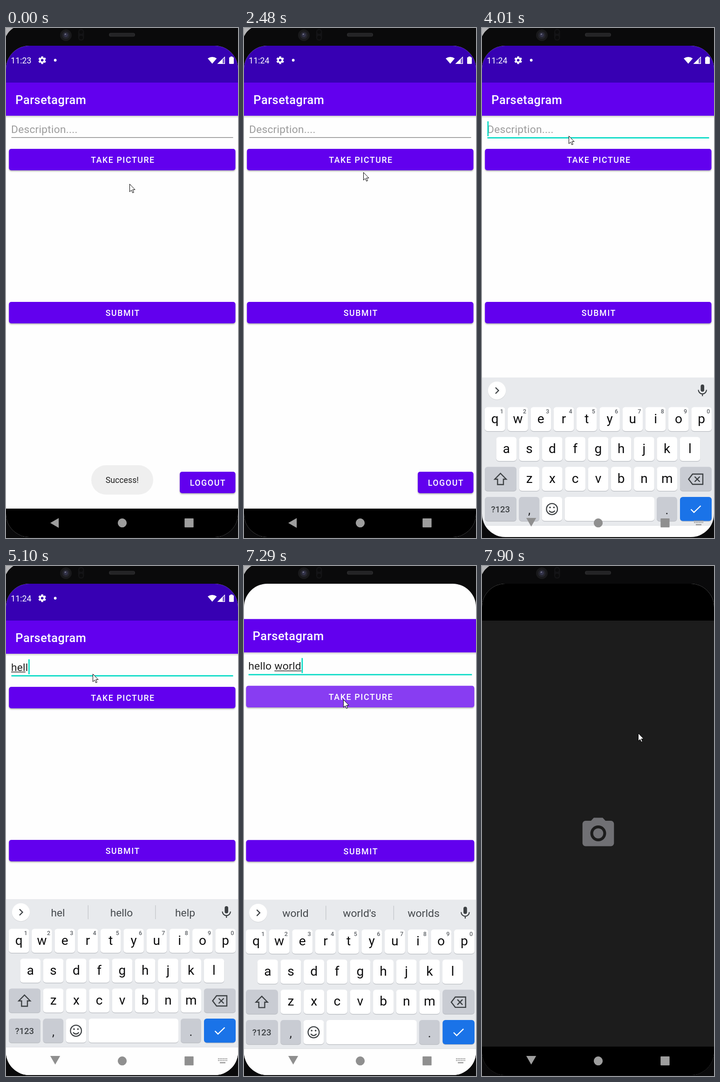
Animation of 498 by 1093 pixels, one loop 8000 ms. Source, as an HTML page with a canvas:

```html
<!DOCTYPE html>
<html lang="en">
<head>
<meta charset="utf-8">
<title>Post a picture</title>
<style>
html, body { margin: 0; width: 100%; height: 100%; overflow: hidden; background: #0a0a0b; }
canvas { display: block; width: 498px; height: 1093px; }
</style>
</head>
<body>
<canvas id="stage" width="498" height="1093"></canvas>
<script>
const g = document.getElementById('stage').getContext('2d');
const LOOP = 8000, W = 498, H = 1093;
const PURPLE = '#6200ee', TEAL = '#03dac5', INK = '#3c4043';
const FIELD = { size: 22.8, ls: 0.21 };

// Each row: start time, then the values held until the next row.
const pointer = [
  [0, 265, 334], [120, 240, 276], [240, 219, 236], [360, 212, 224],
  [2240, 230, 270], [2360, 254, 346], [2480, 256, 309], [2630, 258, 287],
  [3410, 218, 250], [3530, 186, 231], [6930, 199, 262], [7050, 213, 286],
  [7530, 285, 331], [7650, 335, 358]
];
// typed text, underlined range, suggestions
const typing = [
  [0, '', 0, 0, ''],
  [4620, 'h', 0, 0, ''],
  [4740, 'he', 0, 1, 'h,have,how'],
  [4860, 'he', 0, 2, 'he,hey,her'],
  [4980, 'hel', 0, 2, 'he,hello,help'],
  [5100, 'hell', 0, 3, 'hel,hello,help'],
  [5230, 'hello', 0, 4, 'hell,hello,help'],
  [5380, 'hello ', 0, 0, 'hello,hellos,help'],
  [5500, 'hello w', 6, 6, 'and,I,there'],
  [5620, 'hello wo', 6, 7, 'w,with,what'],
  [5740, 'hello worl', 6, 8, 'wo,would,world'],
  [5860, 'hello world', 6, 9, 'wor,world,work'],
  [6000, 'hello world', 6, 9, 'worl,world,work'],
  [6140, 'hello world', 6, 11, "world,world's,worlds"]
];
const caret = [[0, 0], [3650, 1], [4250, 0], [4620, 1], [6640, 0], [7170, 1]];
const toast = [[0, 1], [1320, 0.9], [1440, 0.6], [1560, 0.25], [1710, 0]];
const keyboardDrop = [[0, 999], [3890, 150], [4010, 35], [4130, 0], [7530, 999]];
const appZoom = [[0, 1], [7290, 1.0075], [7410, 1.04]];
const cameraZoom = [[0, 0], [7410, 0.94], [7530, 0.99], [7650, 1]];
const ripple = [[0, 0], [7170, 150], [7290, 600]];

function at(track, t) {
  let row = track[0];
  for (const r of track) if (r[0] <= t) row = r;
  return row.slice(1);
}

function rect(x, y, w, h, color) {
  g.fillStyle = color;
  g.fillRect(x, y, w, h);
}

function round(x, y, w, h, r, color) {
  g.beginPath();
  g.roundRect(x, y, w, h, r);
  g.fillStyle = color;
  g.fill();
}

function disc(x, y, r, color) {
  g.beginPath();
  g.arc(x, y, r, 0, 2 * Math.PI);
  g.fillStyle = color;
  g.fill();
}

function shape(color, ...pts) {
  g.beginPath();
  pts.forEach(p => g.lineTo(p[0], p[1]));
  g.closePath();
  g.fillStyle = color;
  g.fill();
}

function stroke(color, width, d) {
  g.strokeStyle = color;
  g.lineWidth = width;
  g.stroke(new Path2D(d));
}

function text(s, x, y, size, color, { weight = 400, align = 'left', ls = 0 } = {}) {
  g.font = `${weight} ${size}px Roboto, sans-serif`;
  g.letterSpacing = ls + 'px';
  g.textAlign = align;
  g.fillStyle = color;
  g.fillText(s, x, y);
}

function fieldWidth(s) {
  g.font = `400 ${FIELD.size}px Roboto, sans-serif`;
  g.letterSpacing = FIELD.ls + 'px';
  return g.measureText(s).width;
}

function button(label, x, y, w, cx) {
  g.save();
  g.shadowColor = 'rgba(0,0,0,0.3)';
  g.shadowBlur = 3;
  g.shadowOffsetY = 2;
  round(x, y, w, 46, 5, PURPLE);
  g.restore();
  return () => text(label, cx, y + 30.2, 17.75, '#fff', { weight: 500, align: 'center', ls: 1.585 });
}

function statusBar(t) {
  const white = '#fff', back = '#3700b3';
  rect(0, 38, W, 79, back);
  text(t < 1440 ? '11:23' : '11:24', 10.3, 76, 17.75, white);
  for (let i = 0; i < 6; i++) {
    g.save();
    g.translate(77.7, 69);
    g.rotate(i * Math.PI / 3);
    rect(-2.2, -8.2, 4.4, 5, white);
    g.restore();
  }
  disc(77.7, 69, 6.2, white);
  disc(77.7, 69, 2.8, back);
  disc(105.7, 69, 2.9, white);
  g.fillStyle = white;
  g.fill(new Path2D('M442.7 76.5L433 65.3Q442.7 58.5 452.4 65.3Z'));
  shape('rgba(255,255,255,0.35)', [454, 77], [470, 77], [470, 61]);
  shape(white, [454, 77], [465, 77], [465, 66]);
  stroke(white, 1.2, 'M455 76.4H469.4V62.4Z');
  round(479, 62.5, 10, 14.5, 1.5, white);
  rect(481.8, 61, 4.4, 2, white);
}

function field(t) {
  const [typed, from, to] = at(typing, t);
  const focused = t >= 3650;
  if (typed) text(typed, 11, 225, FIELD.size, '#212121', FIELD);
  else text('Description....', 11, 225, FIELD.size, '#9c9c9c', FIELD);
  if (to > from) {
    const x = fieldWidth(typed.slice(0, from));
    rect(11 + x, 226.6, fieldWidth(typed.slice(0, to)) - x, 1.4, '#212121');
  }
  if (focused) rect(11.5, 234, 476, 2.7, TEAL);
  else rect(11.5, 234, 476, 1.3, '#7c7c7c');
  if (at(caret, t)[0]) rect(11.5 + fieldWidth(typed), 200, 2.7, 32, TEAL);
}

function app(t) {
  const shade = g.createLinearGradient(0, 188, 0, 193);
  shade.addColorStop(0, 'rgba(0,0,0,0.2)');
  shade.addColorStop(1, 'rgba(0,0,0,0)');
  rect(0, 188, W, 5, shade);
  rect(0, 117, W, 71, PURPLE);
  text('Parsetagram', 20.3, 162.5, 25.4, '#fff', { weight: 500, ls: 0.5 });
  field(t);

  const takeLabel = button('TAKE PICTURE', 6.3, 259, 486.2, 251);
  const r = at(ripple, t)[0];
  if (r) {
    g.save();
    g.beginPath();
    g.roundRect(6.3, 259, 486.2, 46, 5);
    g.clip();
    disc(213, 286, r, 'rgba(255,255,255,0.24)');
    g.restore();
  }
  takeLabel();
  button('SUBMIT', 6.3, 587, 486.2, 250.8)();
  button('LOGOUT', 373, 951, 119.5, 433.4)();

  g.globalAlpha = at(toast, t)[0];
  round(183, 937, 133, 63, 31.5, '#efefef');
  text('Success!', 249.3, 975, 17.75, '#212121', { align: 'center' });
  g.globalAlpha = 1;
}

function key(x, y, w, color = '#fff') {
  round(x, y + 1.3, w, 51.5, 6, '#b9bcc1');
  round(x, y, w, 51.5, 6, color);
}

function letters(row, cx, y) {
  [...row].forEach((c, i) => {
    const x = cx + i * 49.27;
    key(x - 21.8, y, 43.6);
    text(c, x, y + 34, 28, '#0c0c0d', { align: 'center' });
  });
}

function suggestions(t) {
  const words = at(typing, t)[3];
  if (!words) return;
  words.split(',').forEach((w, i) =>
    text(w, 111.5 + 136.5 * i, 751, 22.8, '#45494d', { align: 'center' }));
  for (const x of [175.7, 320.2]) rect(x, 727, 1.3, 30, '#c3c6ca');
}

function keyboard(t) {
  const grey = '#c9ccd3';
  rect(0, 714, W, 317, '#e8eaed');
  rect(0, 1031, W, 62, '#fefefe');
  rect(0, 1030.5, W, 1, '#dcdee1');
  disc(32, 743, 19.3, '#d3d5d8');
  disc(32, 742, 19.2, '#fff');
  stroke(INK, 2.3, 'M29 735.5L35.5 742L29 748.5');
  round(469.4, 729, 7.6, 15.5, 3.8, INK);
  stroke(INK, 2.2, 'M464.5 740.5A8.7 8.7 0 0 0 481.9 740.5M473.2 749V754');
  suggestions(t);

  letters('qwertyuiop', 27.7, 777.5);
  for (let i = 0; i < 10; i++)
    text((i + 1) % 10, 42.3 + i * 49.27, 791, 12.5, '#5f6368', { weight: 500, align: 'center' });
  letters('asdfghjkl', 52.3, 841.5);

  key(6, 905.5, 68, grey);
  stroke(INK, 2.4, 'M39.7 919.5L52 932H46V943.5H33.4V932H27.4Z');
  letters('zxcvbnm', 101.6, 905.5);
  key(425, 905.5, 68, grey);
  stroke(INK, 2.4, 'M452 921H474V943H452L443.5 932ZM456.5 926.5L467.5 937.5M467.5 926.5L456.5 937.5');

  key(6, 970, 68, grey);
  text('?123', 39.7, 1003, 18.5, INK, { weight: 500, align: 'center' });
  key(79.5, 970, 43.6, grey);
  text(',', 101.5, 1007, 26, '#202124', { align: 'center' });
  key(128.5, 970, 43.6);
  stroke(INK, 2.3, 'M162 996A11.8 11.8 0 1 1 138.4 996A11.8 11.8 0 1 1 162 996M144 999.5Q150.2 1006.5 156.4 999.5');
  disc(146, 992.5, 1.8, INK);
  disc(154.4, 992.5, 1.8, INK);
  key(177.5, 970, 192.5);
  key(375, 970, 43.6, grey);
  text('.', 397, 1007, 26, '#202124', { align: 'center' });
  key(425, 970, 68, '#1a73e8');
  stroke('#fff', 2.4, 'M448.5 996.5L455 1003L469.5 989');
}

function navIcons(t) {
  const overKeys = t >= 3890;
  const color = t >= 7530 && t < 7900 ? '#808080' : t >= 3890 && t < 7530 ? '#8f8f8f' : '#9e9e9e';
  if (overKeys) shape(color, [95, 1050], [116.3, 1050], [105.6, 1068.5]);
  else shape(color, [95, 1060.8], [113.2, 1050.3], [113.2, 1071.3]);
  disc(249.5, 1060.7, 9.6, color);
  round(383.3, 1051, 19.3, 19.3, 1, color);
  if (t < 3770 || t >= 7900) return;
  for (let row = 0; row < 2; row++)
    for (let i = 0; i < 6; i++) rect(455.2 + i * 3.5, 1055 + row * 3.7, 2.1, 2.1, color);
  rect(459, 1063.4, 12, 2.2, color);
}

function zoomed(k, draw) {
  g.save();
  g.translate(W / 2, 565);
  g.scale(k, k);
  g.translate(-W / 2, -565);
  draw();
  g.restore();
}

function camera(t) {
  rect(0, 38, W, 1053, '#000');
  rect(0, 117, W, 913, '#1c1c1c');
  if (t < 7900) return;
  const grey = '#707074';
  shape(grey, [240, 539.5], [259, 539.5], [266, 547], [233, 547]);
  round(215.7, 546, 67.6, 54.5, 6.5, grey);
  disc(249.5, 573, 17, '#1c1c1c');
  disc(249.5, 573, 10.8, grey);
}

function bezel() {
  rect(0, 0, W, H, '#0a0a0b');
  g.fillStyle = '#b4b4b6';
  g.fill(new Path2D('M0 0H16Q6 6 0 18Z'));
  disc(128.5, 15.5, 12.5, '#19191b');
  disc(128.5, 15.5, 8, '#24242c');
  disc(128.5, 15, 4.5, '#34344a');
  disc(127.3, 13.3, 1.3, '#8a8a9c');
  round(155, 2, 12.5, 25, 6, '#141416');
  disc(161.2, 8.5, 4, '#0b0b0c');
  disc(161.2, 20.5, 4, '#0b0b0c');
  round(221, 10.5, 56, 8, 4, '#29292b');
  for (let x = 225; x < 274; x += 3) rect(x, 12, 1, 5, '#1b1b1d');
}

function arrow(x, y) {
  g.save();
  g.translate(x + 0.5, y + 0.5);
  const p = new Path2D('M0 0V16.5L3.8 13L6.4 18.8L8.9 17.7L6.4 12H11.5Z');
  g.fillStyle = '#fff';
  g.fill(p);
  g.strokeStyle = '#000';
  g.lineWidth = 1;
  g.stroke(p);
  g.restore();
}

function draw(t) {
  bezel();
  g.save();
  g.beginPath();
  g.roundRect(0, 38, W, 1053, 50);
  g.clip();
  rect(0, 38, W, 1053, '#fefefe');

  const zoom = at(appZoom, t)[0];
  const drop = at(keyboardDrop, t)[0];
  if (t < 7290) statusBar(t);
  zoomed(zoom, () => app(t));
  if (t < 3890 || drop > 0) rect(0, 1030, W, 63, '#000');
  if (drop < 400) {
    g.save();
    g.translate(0, drop);
    zoomed(zoom, () => keyboard(t));
    g.restore();
    if (!drop) rect(0, 1035, W, 58, '#fefefe');
  }
  const open = at(cameraZoom, t)[0];
  if (open) zoomed(open, () => camera(t));
  navIcons(t);
  g.restore();
  arrow(...at(pointer, t));
}

function tick(now) {
  draw(now % LOOP);
  requestAnimationFrame(tick);
}
draw(0);
requestAnimationFrame(tick);
</script>
</body>
</html>
```
